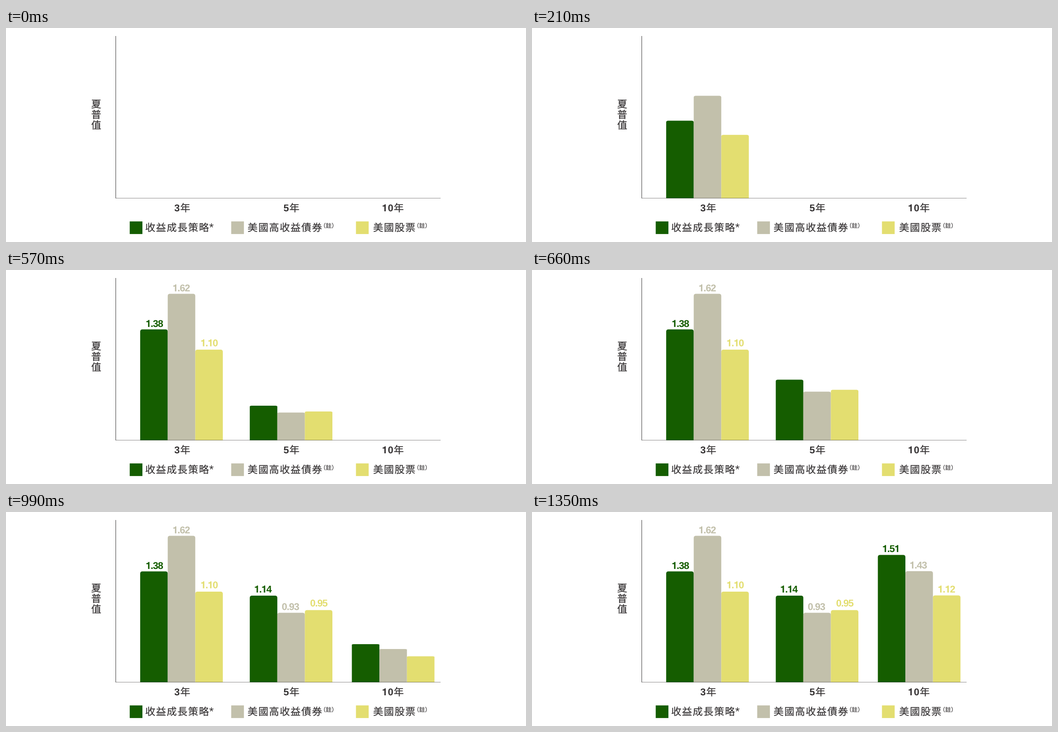
Write a matplotlib script that moves like this. It is 1163 px wide and 481 px high and loops after 2.7 s.

```python
import matplotlib.pyplot as plt
import numpy as np
from matplotlib.animation import FuncAnimation
from matplotlib.patches import PathPatch, Rectangle
from matplotlib.path import Path
from matplotlib.textpath import TextPath

W, H, DPI = 1163, 481, 100
STEP, FRAMES = 30, 90
GROUP_STEPS, GROW_STEPS, FADE_START, FADE_STEPS = 15, 10, 12, 3
BASE, BAR_W, RADIUS = 383, 61.6, 5

INK = "#353233"
COLORS = ["#155d00", "#c2c0ab", "#e3de70"]
BOLD = {"family": "Liberation Sans", "weight": "bold"}
PLAIN = {"family": "Liberation Sans"}
CJK = {"family": "Noto Sans CJK JP"}

# Bold figure one without a foot, in em units
ONE = Path([(0.39, 0), (0.39, 0.71), (0.275, 0.71), (0.25, 0.592),
            (0.07, 0.592), (0.07, 0.487), (0.245, 0.487), (0.245, 0),
            (0.39, 0)],
           [Path.MOVETO, Path.LINETO, Path.LINETO, Path.CURVE3, Path.CURVE3,
            Path.LINETO, Path.LINETO, Path.LINETO, Path.CLOSEPOLY])

# left edge, then per bar: top, value, label centre, label baseline
GROUPS = [
    (300.1, [(133.5, "1.38", 332.5, 128), (53.5, "1.62", 392.5, 48),
             (179, "1.10", 455, 171.5)]),
    (545.2, [(188, "1.14", 575.5, 181), (226.5, "0.93", 636.5, 220.3),
             (220.5, "0.95", 700, 212.3)]),
    (773.5, [(96.5, "1.51", 802, 90), (133, "1.43", 864.5, 127),
             (187.5, "1.12", 927.5, 181)]),
]

fig = plt.figure(figsize=((W + 0.01) / DPI, (H + 0.01) / DPI), dpi=DPI,
                 facecolor="white")
ax = fig.add_axes([0, 0, 1, 1])
ax.set(xlim=(0, W), ylim=(H, 0))
ax.axis("off")


def advance(ch):
    if ch == ".":
        return 0.278
    return 0.556 if ch.isdigit() else 1.0


def glyph(ch, size, font):
    if ch == "1":
        return Path(ONE.vertices * size, ONE.codes)
    return TextPath((0, 0), ch, size=size, prop=font)


def write(text, x, y, size, font, color=INK, track=0.0, stroke=0.0,
          centred=False):
    """Set text on baseline y with letter spacing in pixels."""
    parts, pen = [], 0
    for ch in text:
        shape = glyph(ch, size, font)
        parts.append(Path(shape.vertices * (1, -1) + (pen, 0), shape.codes))
        pen += advance(ch) * size + track
    if centred:
        boxes = [p.get_extents() for p in parts]
        x -= (boxes[0].x0 + boxes[-1].x1) / 2
    line = Path.make_compound_path(*parts)
    patch = PathPatch(Path(line.vertices + (x, y), line.codes),
                      facecolor=color,
                      edgecolor=color if stroke else "none",
                      linewidth=stroke * 72 / DPI, zorder=4)
    return ax.add_patch(patch)


def bar_path(x, top, grow):
    """Bar with rounded top corners, scaled vertically from the baseline."""
    r, right = RADIUS, x + BAR_W
    pts = np.array([(x, BASE), (x, top + r), (x, top), (x + r, top),
                    (right - r, top), (right, top), (right, top + r),
                    (right, BASE), (x, BASE)], float)
    pts[:, 1] = BASE + (pts[:, 1] - BASE) * grow
    codes = [Path.MOVETO, Path.LINETO, Path.CURVE3, Path.CURVE3, Path.LINETO,
             Path.CURVE3, Path.CURVE3, Path.LINETO, Path.CLOSEPOLY]
    return Path(pts, codes)


# Axes
ax.add_patch(Rectangle((245, 18), 1, 365, color=INK, lw=0, zorder=3))
ax.add_patch(Rectangle((245, 382), 727, 1, color="#4a4848", alpha=0.65, lw=0,
                       zorder=3))
for i, ch in enumerate("夏普值"):
    write(ch, 190.5, 179 + 23.7 * i, 22.5, CJK, stroke=0.3)
for digits, x, year_x in [("3", 376.4, 389.6), ("5", 620.6, 633.8),
                          ("10", 840.8, 867.2)]:
    write(digits, x, 412, 22, BOLD, track=1)
    write("年", year_x, 412.4, 22.5, CJK, stroke=0.3)

# Legend
for color, box_x, name, x in [(COLORS[0], 277, "收益成長策略", 311.4),
                              (COLORS[1], 504, "美國高收益債券", 540.3),
                              (COLORS[2], 783, "美國股票", 821.1)]:
    ax.add_patch(Rectangle((box_x - 0.3, 434.7), 28.4, 28.4, color=color,
                           lw=0, snap=False))
    write(name, x, 456.5, 22.5, CJK, track=1.5, stroke=0.2)
write("*", 454.4, 457, 26, PLAIN)
for x in (702.4, 911.3):
    write("（註）", x, 448.9, 12.8, CJK, track=0.1, stroke=0.2)

# Bars and their values
bars = []
for g, (left, items) in enumerate(GROUPS):
    for i, (top, value, centre, base) in enumerate(items):
        x = left + i * BAR_W
        bar = ax.add_patch(PathPatch(bar_path(x, top, 1), facecolor=COLORS[i],
                                     edgecolor="none", zorder=2))
        label = write(value, centre, base, 22, BOLD, COLORS[i], -1.1,
                      centred=True)
        bars.append((g, x, top, bar, label))


def update(frame):
    artists = []
    for g, x, top, bar, label in bars:
        k = frame - g * GROUP_STEPS
        grow = min(max(k / GROW_STEPS, 0), 1)
        fade = min(max((k - FADE_START) / FADE_STEPS, 0), 1)
        bar.set_path(bar_path(x, top, grow))
        bar.set_visible(grow > 0)
        label.set_alpha(fade)
        label.set_visible(fade > 0)
        artists += [bar, label]
    return artists


anim = FuncAnimation(fig, update, frames=FRAMES, init_func=lambda: update(0),
                     interval=STEP, repeat=True, repeat_delay=0, blit=False)
plt.show()
```
